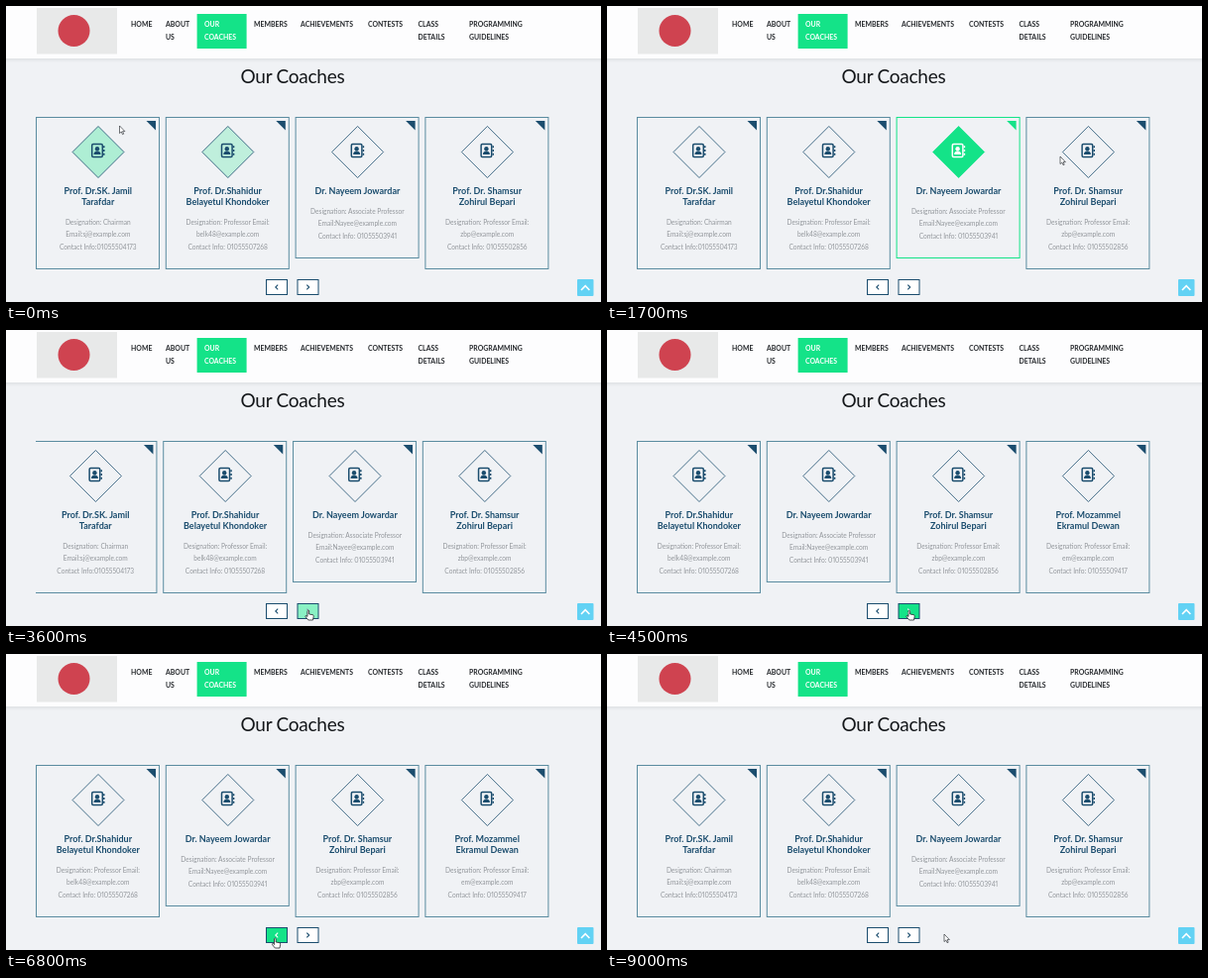
An HTML page for the animation above (9100 ms loop, 600 px wide and 299 px high).

```html
<!DOCTYPE html>
<html lang="en">
<head>
<meta charset="utf-8">
<title>Our Coaches</title>
<style>
  html, body { margin: 0; width: 100%; height: 100%; overflow: hidden; background: #f0f2f5; }
  svg { display: block; width: 100vw; height: 100vh; }
  text { font-family: Lato, "Open Sans", sans-serif; }
  .nav { font-size: 6.9px; font-weight: 700; fill: #25282c; }
  .nav.on { fill: #fff; }
  .title { font-size: 19px; fill: #14171a; letter-spacing: -.25px; text-anchor: middle; }
  .name { font-size: 9px; font-weight: 700; fill: #1b4d6e; text-anchor: middle; }
  .info { font-size: 6.6px; fill: #92969b; text-anchor: middle; font-variant-numeric: proportional-nums; }
</style>
</head>
<body>
<svg viewBox="0 0 600 299">
  <defs>
    <clipPath id="window"><rect x="30" y="105" width="519" height="170"/></clipPath>
    <linearGradient id="shade" x2="0" y2="1">
      <stop stop-color="#dfe2e5"/><stop offset="1" stop-color="#f0f2f5"/>
    </linearGradient>
  </defs>
  <rect width="600" height="299" fill="#f0f2f5"/>
  <rect y="53" width="600" height="4" fill="url(#shade)"/>
  <rect width="600" height="53" fill="#fdfdfe"/>
  <rect x="31" y="2" width="81" height="46.500" fill="#e8e9e9"/>
  <circle cx="68.500" cy="25" r="16" fill="#cf4350"/>
  <rect x="192.600" y="8" width="50" height="35" fill="#14e388"/>
  <g id="menu"></g>
  <text class="title" x="289" y="78">Our Coaches</text>
  <g id="cards" clip-path="url(#window)"></g>
  <g id="buttons"></g>
  <rect x="576" y="276" width="16.500" height="17" rx="1" fill="#62d2f4"/>
  <path d="M580 287l4.200-4.300 4.200 4.300" fill="none" stroke="#fff" stroke-width="1.600"/>
  <path id="arrow" d="M0 0V7.600L1.800 6 3 8.700 4.200 8.200 3 5.600H5.400Z" fill="#fff" stroke="#33373b" stroke-width=".7" stroke-linejoin="round"/>
  <path id="hand" d="M0 .6Q.8-.6 1.600.6V4L5.400 4.700Q6.300 5 6.200 6.200L5.500 10H.8L-2 6.600Q-2.300 5.300-1 5.600L0 6.500Z" fill="#fff" stroke="#25282c" stroke-width=".8" stroke-linejoin="round"/>
</svg>
<script>
const LOOP = 9100, STEP = 100, FADE = 400, SLIDE = 600, LEFT = 30, PITCH = 130.8;
const NAVY = [27, 77, 110], LINE = [90, 140, 160], GREEN = [20, 227, 136],
      PAGE = [240, 242, 245], WHITE = [255, 255, 255];

const menu = [
  [126, "HOME"], [161, "ABOUT", "US"], [200, "OUR", "COACHES"], [250, "MEMBERS"],
  [297, "ACHIEVEMENTS"], [365, "CONTESTS"], [415.5, "CLASS", "DETAILS"],
  [467, "PROGRAMMING", "GUIDELINES"]
];

const prof = "Designation: Professor Email:";
const coaches = [
  { name: ["Prof. Dr.SK. Jamil", "Tarafdar"],
    info: ["Designation: Chairman", "Email:sj@example.com", "Contact Info:01055504173"] },
  { name: ["Prof. Dr.Shahidur", "Belayetul Khondoker"],
    info: [prof, "belk48@example.com", "Contact Info: 01055507268"] },
  { name: ["Dr. Nayeem Jowardar"],
    info: ["Designation: Associate Professor", "Email:Nayee@example.com", "Contact Info: 01055503941"] },
  { name: ["Prof. Dr. Shamsur", "Zohirul Bepari"],
    info: [prof, "zbp@example.com", "Contact Info: 01055502856"] },
  { name: ["Prof. Mozammel", "Ekramul Dewan"],
    info: [prof, "em@example.com", "Contact Info: 01055509417"] },
  { name: ["Prof. Dr. Golamur", "Foyez Munshir"],
    info: [prof, "gf@example.com", "Contact Info: 01055506352"] }
];

// The pointer visits cards one after another; each visit ends as the next begins
const visits = [
  { card: 1, from: -900, to: -310 },
  { card: 0, from: -120, to: 800 },
  { card: 1, from: 800, to: 1250 },
  { card: 2, from: 1250, to: 1700 },
  { card: 3, from: 1700, to: 2320 },
  { card: 2, from: 2320, to: 2480 }
];
const controls = [
  { x: 273, dir: -1, from: 5600, to: 8300, clicks: [5850, 7250] },
  { x: 304.5, dir: 1, from: 3400, to: 5300, clicks: [3550, 4750] }
];
const path = [
  [0, 114.5, 121], [700, 100, 160], [1700, 457, 152], [2100, 475, 170],
  [2700, 353, 273], [3500, 304, 283], [5300, 304, 283], [5700, 270.5, 287],
  [8250, 270.5, 287], [8900, 340, 283]
];

const $ = id => document.getElementById(id);
const clamp = v => Math.max(0, Math.min(1, v));
const ease = p => p * p * (3 - 2 * p);
const ramp = (t, from, span) => clamp((t - from) / span);
const glow = (t, { from, to }) => ramp(t, from, FADE) - ramp(t, to, FADE);
const sum = (list, f) => list.reduce((total, item) => total + f(item), 0);

function mix(a, b, p) {
  return `rgb(${a.map((v, i) => Math.round(v + (b[i] - v) * p))})`;
}

function shiftAt(t) {
  return sum(controls, c => c.dir * sum(c.clicks, click => ease(ramp(t, click, SLIDE))));
}

function pointerAt(t) {
  let [, x, y] = path[0];
  for (let i = 1; i < path.length; i++) {
    const [start] = path[i - 1], [end, nx, ny] = path[i];
    const p = ease(ramp(t, start, end - start));
    x += (nx - x) * p;
    y += (ny - y) * p;
  }
  return [x, y];
}

const label = (cls, x, y, s) => `<text class="${cls}" x="${x}" y="${y}">${s}</text>`;

function cardMarkup({ name, info }) {
  const lift = name.length > 1 ? 0 : 11;
  return `<g>
    <rect class="frame" x=".5" y="112.5" width="124" height="${153 - lift}" fill="none"/>
    <path class="corner" d="M111.500 116H121V125.500Z"/>
    <path class="diamond" d="M63 121.500l26 26-26 26-26-26Z" stroke-width=".8"/>
    <g class="icon" stroke-width="1.500" transform="translate(62.500 146)">
      <rect x="-5.800" y="-6.500" width="10.600" height="13" rx="1.200" fill="none"/>
      <path d="M6.300-4.700v2M6.300-1v2M6.300 2.700v2"/>
      <circle cx="-.5" cy="-1.700" r="2.200" stroke="none"/>
      <path d="M-4 3.900Q-4 .4-.5.400T3 3.900Z" stroke="none"/>
    </g>
    ${name.map((s, i) => label("name", 62.8, 190.3 + i * 11, s)).join("")}
    ${info.map((s, i) => label("info", 62.8, 220.5 - lift + i * 12.5, s)).join("")}
  </g>`;
}

function buttonMarkup({ x, dir }) {
  return `<g transform="translate(${x} 284)">
    <rect x="-10.5" y="-7.5" width="21" height="15" stroke="#1b4d6e"/>
    <path d="M${-dir * 1.2} -2.300L${dir * 1.2} 0L${-dir * 1.2} 2.300" fill="none" stroke-width="1.100"/>
  </g>`;
}

$("menu").innerHTML = menu.map(([x, ...lines]) =>
  lines.map((s, i) => label(lines[0] === "OUR" ? "nav on" : "nav", x, 21 + i * 12.7, s)).join("")).join("");
$("cards").innerHTML = coaches.map(cardMarkup).join("");
$("buttons").innerHTML = controls.map(buttonMarkup).join("");

const cards = [...$("cards").children].map(node => ({
  node,
  frame: node.querySelector(".frame"),
  corner: node.querySelector(".corner"),
  diamond: node.querySelector(".diamond"),
  icon: node.querySelector(".icon")
}));
const buttons = [...$("buttons").children];

function paintCard(card, x, level) {
  const edge = clamp(level * 2 - 1);
  const ink = mix(NAVY, WHITE, edge);
  card.node.setAttribute("transform", `translate(${x} 0)`);
  card.frame.setAttribute("stroke", mix(LINE, GREEN, edge));
  card.corner.setAttribute("fill", mix(NAVY, GREEN, edge));
  card.diamond.setAttribute("fill", mix(PAGE, GREEN, level));
  card.diamond.setAttribute("stroke", mix(NAVY, GREEN, edge));
  card.icon.setAttribute("fill", ink);
  card.icon.setAttribute("stroke", ink);
}

function draw(t) {
  const shift = shiftAt(t);
  cards.forEach((card, i) => {
    const level = sum(visits.filter(v => v.card === i), v => glow(t, v));
    paintCard(card, LEFT + (i - shift) * PITCH, clamp(level));
  });

  const [x, y] = pointerAt(t);
  let pointing = false;
  controls.forEach((control, i) => {
    const level = glow(t, control);
    const [box, chevron] = buttons[i].children;
    box.setAttribute("fill", mix(WHITE, GREEN, level));
    chevron.setAttribute("stroke", mix(NAVY, WHITE, level));
    pointing ||= Math.abs(x - control.x) < 11 && Math.abs(y - 284) < 8;
  });

  $("arrow").setAttribute("visibility", pointing ? "hidden" : "visible");
  $("hand").setAttribute("visibility", pointing ? "visible" : "hidden");
  for (const id of ["arrow", "hand"]) $(id).setAttribute("transform", `translate(${x} ${y})`);
}

// The picture advances ten times a second
const start = performance.now();
function tick() {
  const t = (performance.now() - start) % LOOP;
  draw(Math.floor(t / STEP) * STEP);
  requestAnimationFrame(tick);
}
tick();
</script>
</body>
</html>
```
